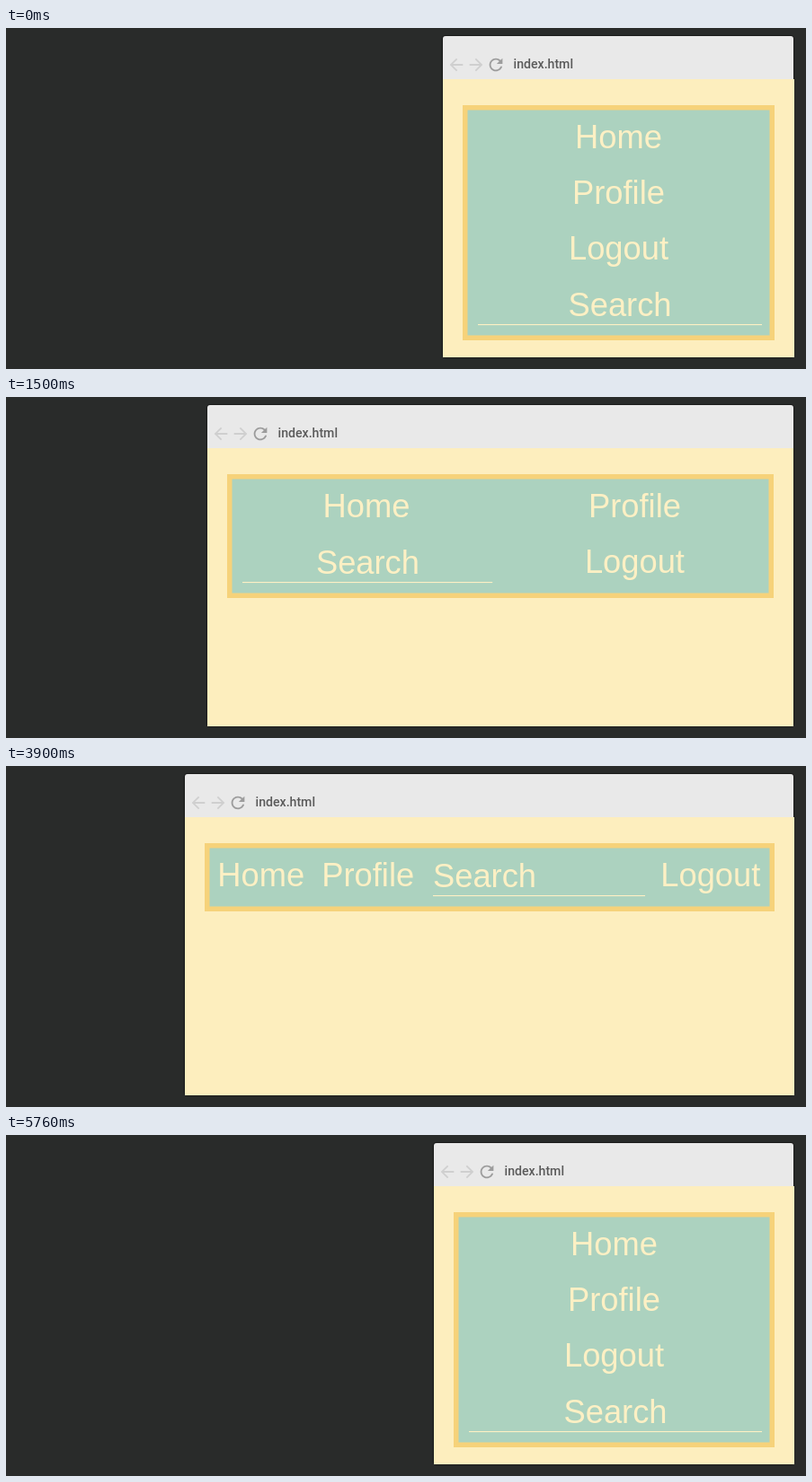
These frames come from a looping animation (890x380 px, 5.79 s). An HTML page:

```html
<!DOCTYPE html>
<html lang="en">
<head>
<meta charset="utf-8">
<title>Responsive menu</title>
<style>
  html, body { margin: 0; width: 100%; height: 100%; overflow: hidden; background: #292b2a; }
  svg { display: block; }
  .item { font: 36.3px "Liberation Sans", Arial, sans-serif; fill: #fdf0c4; }
  .title { font: 500 14.1px Roboto, sans-serif; fill: #5a5a5a; }
</style>
</head>
<body>
<svg width="890" height="380" viewBox="0 0 890 380">
  <rect width="890" height="380" fill="#292b2a"/>
  <rect id="shadow" y="9" height="358" rx="3" fill="none" stroke="#000" stroke-opacity=".3" stroke-width="2.5"/>
  <path id="header" fill="#e9e9e9"/>
  <rect id="page" y="57" height="310" fill="#fdeebe"/>
  <g id="toolbar">
    <g fill="#cfcfcf">
      <path id="arrow" transform="translate(15 41) scale(.92) translate(-12 -12)" d="M20 11H7.83l5.59-5.59L12 4l-8 8 8 8 1.41-1.41L7.83 13H20v-2z"/>
      <use href="#arrow" transform="translate(52 0) scale(-1 1)"/>
    </g>
    <path fill="#9c9c9c" transform="translate(59 41) scale(.92) translate(-12 -12)" d="M17.65 6.35C16.2 4.9 14.21 4 12 4c-4.42 0-7.99 3.58-7.99 8s3.57 8 7.99 8c3.73 0 6.84-2.55 7.73-6h-2.08c-.82 2.33-3.04 4-5.65 4-3.31 0-6-2.69-6-6s2.69-6 6-6c1.66 0 3.14.69 4.22 1.78L13 11h7V4l-2.35 2.35z"/>
    <text class="title" x="78.6" y="45">index.html</text>
  </g>
  <rect id="menu" y="88.75" fill="#acd2bf" stroke="#f6d27a" stroke-width="5.5"/>
  <rect id="underline" height="1.1" fill="#fdf0c4"/>
  <text class="item" id="home">Home</text>
  <text class="item" id="profile">Profile</text>
  <text class="item" id="search">Search</text>
  <text class="item" id="logout">Logout</text>
</svg>
<script>
const LOOP = 5790, STEP = 30, RIGHT = 876, ROW = 62;
// Left edge of the dragged window: [ms, px]
const drag = [
  [0, 486], [600, 369], [1200, 283], [1500, 224], [1800, 138], [2370, 54],
  [2460, 53], [2700, 53], [3000, 57], [3600, 113], [3900, 199], [4200, 282],
  [4740, 372], [4800, 380], [5400, 456], [5790, 478]
];
const el = id => document.getElementById(id);
const set = (id, attrs) => {
  for (const name in attrs) el(id).setAttribute(name, attrs[name]);
};

const secant = i => (drag[i + 1][1] - drag[i][1]) / (drag[i + 1][0] - drag[i][0]);

// Harmonic mean keeps the curve free of overshoot.
function tangent(i) {
  if (i === 0) return secant(0);
  if (i === drag.length - 1) return secant(i - 1);
  const a = secant(i - 1), b = secant(i);
  return a * b > 0 ? 2 * a * b / (a + b) : 0;
}

function leftEdge(t) {
  let i = 0;
  while (i < drag.length - 2 && t >= drag[i + 1][0]) i++;
  const [t0, x0] = drag[i], [t1, x1] = drag[i + 1];
  const h = t1 - t0, u = (t - t0) / h, v = 1 - u;
  return x0 * (1 + 2 * u) * v * v + tangent(i) * h * u * v * v
       + x1 * u * u * (3 - 2 * u) - tangent(i + 1) * h * u * u * v;
}

function place(id, x, row, anchor = "middle") {
  const drop = id === "search" ? 1 : 0;
  set(id, { x, y: 134 + drop + row * ROW, "text-anchor": anchor });
}

function underline(from, to, row) {
  set("underline", { x: from, width: to - from, y: 144 + row * ROW });
}

function layoutColumn(l, r) {
  const mid = (l + r) / 2;
  ["home", "profile", "logout"].forEach((id, row) => place(id, mid, row));
  place("search", mid + 1.5, 3);
  underline(l + 17, r - 14, 3);
  return 4;
}

function layoutGrid(l, r) {
  const mid = (l + r) / 2 + .2, quarter = (r - l - 11) / 4;
  place("home", mid - quarter, 0);
  place("profile", mid + quarter, 0);
  place("search", mid - quarter + 1.5, 1);
  place("logout", mid + quarter, 1);
  underline(l + 17, mid - 9, 1);
  return 2;
}

function layoutRow(l, r) {
  place("home", l + 14.3, 0, "start");
  place("profile", l + 130.3, 0, "start");
  place("search", l + 254, 0, "start");
  place("logout", r - 15.7, 0, "end");
  underline(l + 254, r - 144, 0);
  return 1;
}

function draw(time) {
  const x = Math.round(leftEdge(Math.floor(time % LOOP / STEP) * STEP));
  const width = RIGHT - x;
  // The page snaps to whole units of 1.1 px, so its edge drifts by a pixel.
  const pageRight = RIGHT + (Math.abs(width % 11 - 5.5) < 2 ? 1 : 0);
  const l = x + 22, r = pageRight - 22;

  set("shadow", { x, width });
  set("header", { d: `M${x} 57V12q0-3 3-3H${RIGHT - 3}q3 0 3 3V57z` });
  set("page", { x, width: pageRight - x });
  set("toolbar", { transform: `translate(${x} 0)` });

  const layout = width < 440 ? layoutColumn : width < 660 ? layoutGrid : layoutRow;
  const rows = layout(l, r);
  set("menu", { x: l + 2.75, width: r - l - 5.5, height: 8.5 + rows * ROW });
}

const start = performance.now();
function tick() {
  draw(performance.now() - start);
  requestAnimationFrame(tick);
}
tick();
</script>
</body>
</html>
```
